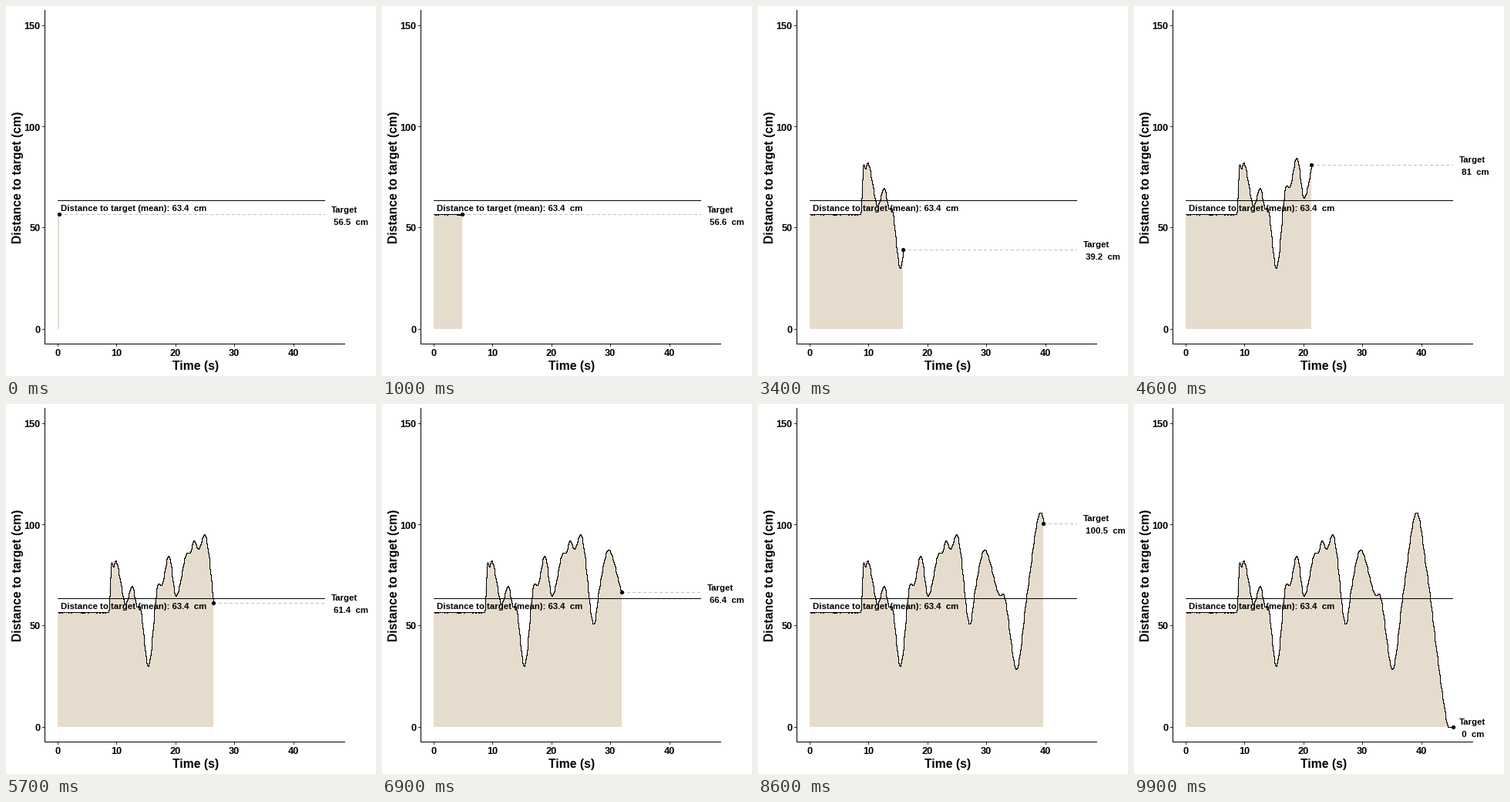
Recreate the animation shown at these times as a matplotlib script. Size 480 by 480 pixels, loop 10 s.

```python
import matplotlib.pyplot as plt
import numpy as np
from matplotlib.animation import FuncAnimation
from matplotlib.patches import Circle, Polygon

SIZE, DPI, FRAMES = 480, 100, 100
PX = 72 / DPI  # one pixel in points
T_START, T_STEP, T_END = 0.25, 0.4585, 45.4
MEAN = 63.4

plt.rcParams["font.family"] = "Liberation Sans"
plt.rcParams["font.weight"] = "bold"

# Peaks, valleys and shoulders of the swing: (seconds, cm)
KEYS = [
    (8.65, 56.5), (9.05, 81.6), (9.42, 79), (9.75, 82), (11.45, 60.8),
    (12.55, 69.5), (13.45, 59.3), (13.75, 59.9), (15.3, 30.1), (17.06, 70.9),
    (17.5, 69.9), (18.78, 84.5), (20, 64.6), (21.95, 86), (22.35, 86),
    (23.05, 92), (23.8, 88), (24.85, 95), (27.1, 50.8), (28, 68),
    (29.55, 87.5), (32.3, 65), (32.7, 65.7), (35, 28.4), (36.75, 64.8),
    (39.1, 105.8), (40.8, 77), (43.5, 15.5), (44.5, 0), (T_END, 0),
]
KX, KY = np.array(KEYS).T


def key_slopes(x, y):
    """Harmonic mean of neighbouring slopes, zero at peaks and valleys."""
    s = np.diff(y) / np.diff(x)
    a, b = s[:-1], s[1:]
    same = a * b > 0
    mid = np.where(same, 2 * a * b / np.where(same, a + b, 1), 0)
    return np.concatenate([[0], mid, [0]])


KM = key_slopes(KX, KY)


def distance(t):
    t = np.asarray(t, float)
    i = np.clip(np.searchsorted(KX, t, side="right") - 1, 0, len(KX) - 2)
    h = KX[i + 1] - KX[i]
    u = np.clip((t - KX[i]) / h, 0, 1)
    v = 1 - u
    swing = (v * v * (1 + 2 * u) * KY[i] + u * v * v * h * KM[i]
             + u * u * (3 - 2 * u) * KY[i + 1] - u * u * v * h * KM[i + 1])
    rest = 56.54 - 0.04 * np.sin(5 * t)
    return np.where(t < KX[0], rest, swing)


def to_x(t):
    return 66.9 + 7.65 * np.asarray(t)


def to_y(cm):
    return 418.6 - 2.625 * np.asarray(cm)


# Full trace, with small sensor jitter while resting
TS = np.arange(0, T_END + 0.05, 0.1)
VS = distance(TS)
jitter = np.random.default_rng(4).random(len(TS)) < 0.22
VS[jitter & (TS < 8.5)] -= 0.25

# Integer data coordinates fall on pixel centres
fig = plt.figure(figsize=(SIZE / DPI, SIZE / DPI), dpi=DPI, facecolor="white")
ax = fig.add_axes([0, 0, 1, 1])
ax.set_xlim(-0.5, SIZE - 0.5)
ax.set_ylim(SIZE - 0.5, -0.5)
ax.axis("off")


def line(xs, ys, color="black", z=3, width=1, **kw):
    return ax.plot(xs, ys, color=color, lw=width * PX, zorder=z, snap=False,
                   antialiased=False, solid_capstyle="butt", **kw)[0]


def label(x, y, s, px, **kw):
    kw.setdefault("va", "baseline")
    return ax.text(x, y, s, fontsize=px * PX, zorder=6, **kw)


# Axes
line([49.5, 439.5], [438, 438])
line([50, 50], [4.5, 438.5])
for sec in range(0, 50, 10):
    x = round(float(to_x(sec)))
    line([x, x], [438.5, 441.5], "#333333")
    label(x - 0.5, 453.5, str(sec), 12.8, ha="center")
for cm in range(0, 200, 50):
    y = round(float(to_y(cm)))
    line([46.5, 49.5], [y, y], "#333333")
    label(44.3, y + 5, str(cm), 12.8, ha="right")
label(245.3, 471.5, "Time (s)", 15.8, ha="center")
label(23, 222, "Distance to target (cm)", 15.8, rotation=90,
      ha="right", va="center")

# Mean level
mean_y = round(float(to_y(MEAN)))
line([66.5, 413.5], [mean_y, mean_y], z=4)
label(70.5, 265.5, f"Distance to target (mean): {MEAN:g}  cm", 11.4)

# Moving parts
area = ax.add_patch(Polygon([(0, 0)] * 3, fc="#E5DCCD", ec="none", zorder=1,
                            antialiased=False, snap=False))
guide = line([], [], "#BEBEBE", z=2, linestyle=(0, (4, 4)),
             dash_capstyle="butt")
trace = line([], [], width=0.5, drawstyle="steps-post")
dot = ax.add_patch(Circle((0, 0), 2.6, fc="black", ec="none", zorder=5))
name = label(421.8, 0, "Target", 11.4)
value = label(421.8, 0, "", 11.4)


def update(n):
    t = min(T_START + T_STEP * n, T_END)
    cm = float(distance(t))
    seen = TS < t
    xs = np.rint(to_x(np.append(TS[seen], t)))
    ys = np.rint(to_y(np.append(VS[seen], cm)))
    x, y = xs[-1], ys[-1]

    left, right, base = 66.5, x - 0.5, 418.5
    top = np.column_stack([np.clip(xs, left, right), ys])
    area.set_xy(np.vstack([top, (right, base), (left, base)]))
    trace.set_data(xs, ys)
    guide.set_data([x, 413.5], [y, y])
    dot.center = x, y
    text_y = float(to_y(cm))
    name.set_y(text_y - 2.9)
    value.set_y(text_y + 13.1)
    value.set_text(f" {abs(round(cm, 1)):g}  cm")
    return area, trace, guide, dot, name, value


anim = FuncAnimation(fig, update, frames=FRAMES, interval=100, repeat=True,
                     repeat_delay=0, blit=False)
plt.show()
```
